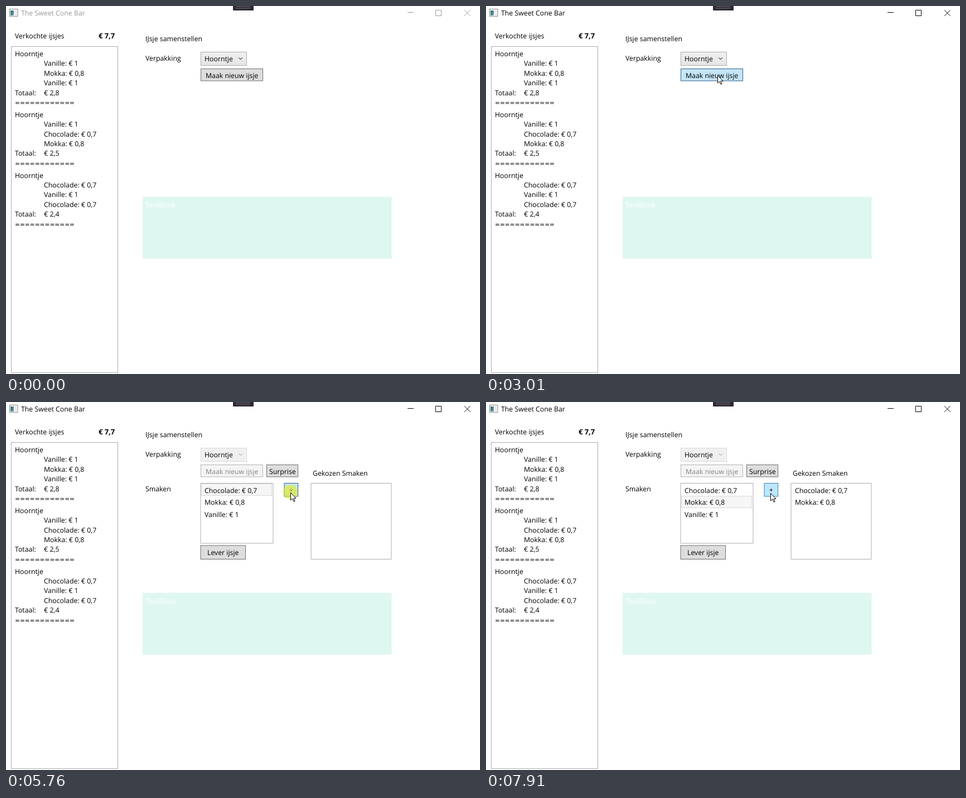
An HTML page that plays this animation: 850x659 px, repeating every 8 s.

```html
<!DOCTYPE html>
<html lang="nl">
<head>
<meta charset="utf-8">
<title>IJsjes</title>
<style>
html, body { margin: 0; width: 100%; height: 100%; overflow: hidden; background: #fff; }
svg { display: block; width: 850px; height: 659px; }
text { font: 12.3px "Open Sans", "Noto Sans", sans-serif; text-rendering: geometricPrecision; fill: #000; }
text.sum { font-size: 12.9px; font-weight: 700; }
text.rule { font: 10.65px "DejaVu Sans", sans-serif; }
.box { fill: #fff; stroke: #abadb3; }
.btn { fill: #ddd; stroke: #707070; }
.btn.hover { fill: #bee6fd; stroke: #3c7fb1; }
.btn.down { fill: #c4e5f6; stroke: #2c628b; }
.btn.off { fill: #f4f4f4; stroke: #adb2b5; }
.btn.off + text { fill: #838383; }
.combo { fill: url(#face); stroke: #acacac; }
.combo.off { fill: #f0f0f0; stroke: #d9d9d9; }
.row { fill: none; stroke: none; }
.row.hover { fill: rgba(38,160,218,.12); stroke: rgba(38,160,218,.66); }
.row.picked { fill: rgba(38,160,218,.24); stroke: #26a0da; }
.row.picked.hover { fill: rgba(0,128,255,.18); stroke: rgba(0,108,216,.6); }
.row.idle { fill: rgba(218,218,218,.24); stroke: #dadada; }
.line { fill: none; }
</style>
</head>
<body>
<svg id="stage" viewBox="0 0 850 659" xmlns="http://www.w3.org/2000/svg">
  <defs>
    <linearGradient id="face" x2="0" y2="1">
      <stop stop-color="#f0f0f0"/><stop offset="1" stop-color="#e5e5e5"/>
    </linearGradient>
    <linearGradient id="pane" x2="1" y2="1">
      <stop stop-color="#2f6f7c"/><stop offset="1" stop-color="#6f9aa0"/>
    </linearGradient>
  </defs>
</svg>
<script>
const LOOP = 8000;
const stage = document.getElementById('stage');

function add(tag, attrs, parent = stage) {
  const el = document.createElementNS('http://www.w3.org/2000/svg', tag);
  for (const k in attrs) el.setAttribute(k, attrs[k]);
  return parent.appendChild(el);
}
const rect = (x, y, r, b, cls, parent) =>
  add('rect', { x, y, width: r - x, height: b - y, class: cls }, parent);
function text(x, y, str, parent, attrs = {}) {
  const el = add('text', { x, y, ...attrs }, parent);
  el.textContent = str;
  return el;
}
const path = (d, attrs, parent) => add('path', { d, class: 'line', ...attrs }, parent);
const show = (el, on) => el.setAttribute('visibility', on ? 'inherit' : 'hidden');

// Title bar
add('rect', { x: 6.5, y: 5.5, width: 14.5, height: 13, fill: '#fafafa', stroke: '#85898c' });
add('rect', { x: 8, y: 8, width: 6, height: 9, fill: 'url(#pane)' });
path('M15.5 9.5h4M15.5 12.5h4M15.5 15.5h4', { stroke: '#c9d0d3' });
const title = text(27, 17.3, 'The Sweet Cone Bar');
const controls = path('M720 11.5h11M770.5 7.5h10v10h-10zM822 7.3l10.5 10.5M832.5 7.3l-10.5 10.5', {});
add('rect', { x: 407, y: 0, width: 37, height: 8, fill: '#2d2833' });
path('M412 1.5h26M412 4.5h26', { stroke: '#6b6671' });

// Sales list
text(16, 57.7, 'Verkochte ijsjes');
text(166, 58, '€ 7,7', stage, { class: 'sum' });
rect(9.5, 72.5, 200.5, 656.5, 'box');
const price = { Vanille: '€ 1', Mokka: '€ 0,8', Chocolade: '€ 0,7' };
const label = name => name + ': ' + price[name];
const sales = [
  ['€ 2,8', 'Vanille', 'Mokka', 'Vanille'],
  ['€ 2,5', 'Vanille', 'Chocolade', 'Mokka'],
  ['€ 2,4', 'Chocolade', 'Vanille', 'Chocolade']
];
sales.forEach(([total, ...scoops], i) => {
  const y = n => 90 + i * 108.8 + n * 17.4;
  text(16, y(0), 'Hoorntje');
  scoops.forEach((s, n) => text(68, y(n + 1), label(s)));
  text(16, y(4), 'Totaal:');
  text(68, y(4), total);
  text(16, y(5), '='.repeat(12), stage, { class: 'rule' });
});

// Order form
text(250, 63, 'IJsje samenstellen');
text(250, 98.3, 'Verpakking');
const combo = rect(349.5, 82.5, 431.5, 106.5, 'combo');
text(356, 98.7, 'Hoorntje');
const chevron = path('M417.5 92.5l3.2 3.2l3.2 -3.2', { 'stroke-width': 1.2 });
const make = rect(349.5, 112.5, 460.5, 134, 'btn');
text(358, 128.6, 'Maak nieuw ijsje');

add('rect', { x: 245, y: 341.7, width: 446.5, height: 111, fill: '#dff7f1' });
text(250, 360.6, 'TextBlock', stage, { style: 'fill:#fff' });

const form = add('g', {});
rect(467.5, 112.5, 523.5, 134, 'btn', form);
text(472, 128.6, 'Surprise', form);
text(550, 132, 'Gekozen Smaken', form);
text(250, 160, 'Smaken', form);
rect(349, 145.5, 479, 253, 'box', form);
const flavours = ['Chocolade', 'Mokka', 'Vanille'];
const rowY = i => 162.5 + i * 21.8;
const rows = flavours.map((name, i) => {
  const top = 146.5 + i * 22;
  const row = rect(350.5, top, 476.5, top + 21, 'row', form);
  text(356, rowY(i), label(name), form);
  return row;
});
const plus = rect(499, 145.5, 523.5, 169, 'btn', form);
text(511.2, 162, '+', form, { 'text-anchor': 'middle' });
rect(349, 257, 429.5, 281.5, 'btn', form);
text(361, 274, 'Lever ijsje', form);
rect(547, 145.5, 691, 281.5, 'box', form);
const chosen = [0, 1].map(i => text(554, rowY(i), label(flavours[i]), form));

// Pointer
const glow = add('circle', { r: 13, fill: '#e4ea1e', 'fill-opacity': .62 });
const pointer = add('path', {
  d: 'M.5 .5V14L3.7 11L5.9 16.2L8 15.3L5.8 10.3H10Z',
  fill: '#fff', stroke: '#000', 'stroke-width': 1
});

const lin = u => u;
const easeIn = u => u ** 1.5;
const easeOut = u => 1 - (1 - u) ** 1.6;
const smooth = u => u * u * (3 - 2 * u);

// first step, last step, number of steps, x, y, easing
const moves = [
  [380, 380, 1, 717, 556, lin],
  [450, 870, 7, 509, 290, easeOut],
  [1070, 1490, 7, 484, 240, easeIn],
  [1560, 1840, 5, 442, 175, lin],
  [1910, 2260, 6, 415, 124, easeOut],
  [4270, 4270, 1, 417, 124, lin],
  [4470, 4810, 5, 442, 161, smooth],
  [5150, 5620, 7, 510, 162, smooth],
  [6430, 6850, 7, 444, 179, smooth],
  [7110, 7180, 2, 506, 164, lin],
  [7380, 7380, 1, 510, 163, lin]
];
const clicks = [2940, 5010, 5760, 6980, 7510];

function pointerAt(t) {
  let x = 717, y = 556;
  for (const [from, to, n, tx, ty, ease] of moves) {
    if (t < from) break;
    const gap = n > 1 ? (to - from) / (n - 1) : 1;
    const u = ease(Math.min(1, (Math.floor((t - from) / gap + 1e-6) + 1) / n));
    x += (tx - x) * u;
    y += (ty - y) * u;
  }
  return [Math.round(x), Math.round(y)];
}

function over(el, [x, y]) {
  const [l, t, w, h] = ['x', 'y', 'width', 'height'].map(k => +el.getAttribute(k));
  return x >= l && x <= l + w && y >= t && y <= t + h;
}
const setClass = (el, ...names) => el.setAttribute('class', names.filter(Boolean).join(' '));

function draw(t) {
  const within = (a, b) => t >= a && t < b;
  const pos = pointerAt(t);
  const open = t >= 3410;

  const ink = t >= 2940 ? '#000' : '#999';
  title.style.fill = ink;
  controls.setAttribute('stroke', ink);

  setClass(combo, 'combo', open && 'off');
  chevron.setAttribute('stroke', open ? '#bfbfbf' : '#606060');
  setClass(make, 'btn', open ? 'off' : t >= 2940 ? 'down' : over(make, pos) && 'hover');
  show(form, open);

  const pressed = within(5760, 6100) || within(7510, 7910);
  setClass(plus, 'btn', pressed ? 'down' : over(plus, pos) && 'hover');

  const picked = t >= 6980 ? 1 : t >= 5010 ? 0 : -1;
  const idle = within(5760, 6980) || t >= 7510;
  rows.forEach((row, i) => {
    const on = i === picked;
    setClass(row, 'row', on && (idle ? 'idle' : 'picked'), !(on && idle) && over(row, pos) && 'hover');
  });
  show(chosen[0], t >= 6100);
  show(chosen[1], t >= 7910);

  show(glow, clicks.some(c => within(c, c + 70)));
  glow.setAttribute('cx', pos[0]);
  glow.setAttribute('cy', pos[1] - 1);
  show(pointer, t >= 380);
  pointer.setAttribute('transform', `translate(${pos})`);
}

function tick() {
  draw(performance.now() % LOOP);
  requestAnimationFrame(tick);
}
tick();
</script>
</body>
</html>
```
